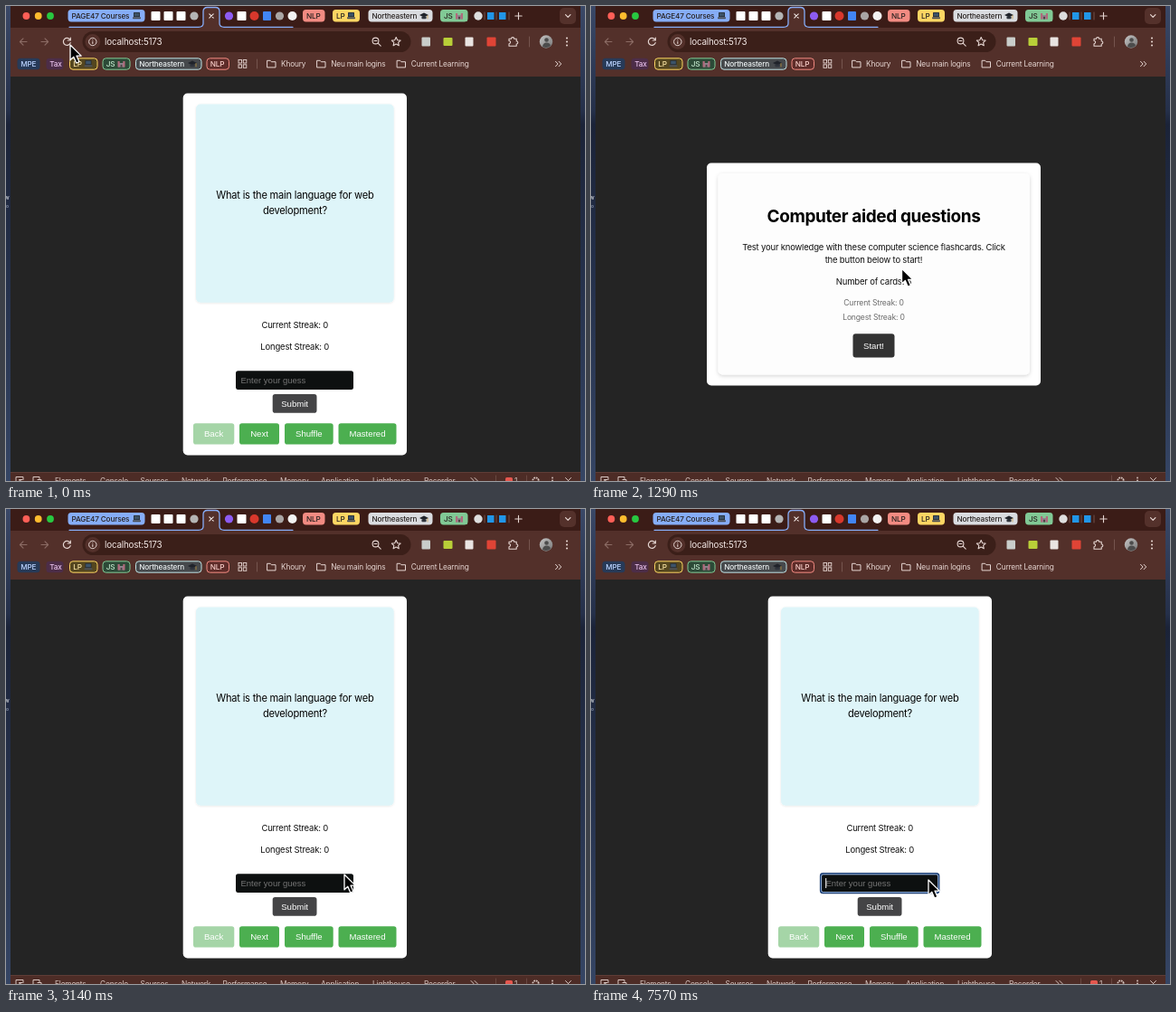
Animation, 640 px wide and 525 px high, one loop 8 s. Source, as an HTML page:

```html
<!DOCTYPE html>
<html lang="en">
<head>
<meta charset="utf-8">
<title>Flashcards</title>
<style>
  html, body { margin: 0; width: 100%; height: 100%; overflow: hidden; background: #242424; }
  svg { display: block; width: 100vw; height: 100vh; }
  text { font-family: Inter, "Open Sans", sans-serif; letter-spacing: -0.02em; white-space: pre; }
  .arial { font-family: "Liberation Sans", Arial, sans-serif; letter-spacing: 0; }
</style>
</head>
<body>
<svg id="stage" viewBox="0 0 640 525" preserveAspectRatio="none" xmlns="http://www.w3.org/2000/svg"></svg>
<script>
const LOOP = 8000, STEP = 1000 / 7;
const PALE = '#e6d6d2', DIM = '#8b6b64';

const rect = (x, y, w, h, fill, r = 0, extra = '') =>
  `<rect x="${x}" y="${y}" width="${w}" height="${h}" rx="${r}" fill="${fill}" ${extra}/>`;
const dot = (x, y, r, fill, extra = '') => `<circle cx="${x}" cy="${y}" r="${r}" fill="${fill}" ${extra}/>`;
const line = (d, color = PALE, w = 1.1) =>
  `<path d="${d}" fill="none" stroke="${color}" stroke-width="${w}" stroke-linecap="round" stroke-linejoin="round"/>`;
const text = (x, y, s, size, fill, extra = '') =>
  `<text x="${x}" y="${y}" font-size="${size}" fill="${fill}" ${extra}>${s}</text>`;
const mid = (x, y, s, size, fill, extra = '') => text(x, y, s, size, fill, 'text-anchor="middle" ' + extra);
const group = (id, body) => `<g id="${id}">${body}</g>`;

// Small pictograms used in the tab and bookmark groups
const laptop = (x, y) => rect(x - 3.5, y - 4, 7, 5, '#23282f', .6) + rect(x - 2.8, y - 3.3, 5.6, 3.6, '#3d5368')
  + rect(x - 4.5, y + 1.3, 9, 2, '#4b4f55', .8);
const cap = (x, y) => `<path d="M${x - 5} ${y - 1}l5-2.6 5 2.6-5 2.6z" fill="#20232a"/>`
  + rect(x - 2.6, y + .5, 5.2, 2.8, '#30343c', 1) + line(`M${x + 4} ${y - .5}v3.4`, '#c99b3a', .7);
const castle = (x, y) => rect(x - 3.5, y - 1, 7, 4.5, '#8d8790') + rect(x - 4, y - 3, 2.2, 6.5, '#b06a7c')
  + rect(x + 1.8, y - 3, 2.2, 6.5, '#b06a7c') + rect(x - .9, y + .8, 1.8, 2.7, '#4a3d3d');
const folder = x => line(`M${x - 4.5} 60.3h3.2l1.2 1.4h4.6v6.2h-9z`, PALE, 1);

function desktop() {
  return rect(0, 0, 640, 525, 'url(#wall)')
    + text(-2, 214, 'w', 7, '#e8ebf0') + text(0, 223, 'o', 5, '#b8c4dc')
    + rect(5, 0, 630, 525, '#242424');
}

function tabStrip() {
  const pill = (x, w, color, label, tail = '') =>
    rect(x, 4, w, 13.4, color, 3.6) + text(x + 4, 13.6, label, 8.2, '#27211f', 'font-weight="500"') + tail;
  const lights = ['#ff5f57', '#febc2e', '#28c840'].map((c, i) => dot(22.4 + 13.3 * i, 11, 3.9, c)).join('');
  const squares = [165.5, 179.5, 193.5, 260.5].map(x => rect(x - 5, 6, 10, 10, '#fff', 1)).join('');
  const seps = [529, 542, 556].map(x => line(`M${x} 7v8`, '#80605a', .8)).join('');
  return rect(5, 0, 630, 24, '#3b1c17') + lights
    + pill(68.5, 85, '#86adf8', 'PAGE47 Courses', laptop(144.5, 11))
    + squares + dot(208, 11, 4.6, '#b4b4b4')
    + '<path d="M214 24q4 0 4-4V6q0-4.5 4.5-4.5h9q4.5 0 4.5 4.5v14q0 4 4 4z" fill="#53302a"/>'
    + line('M70 23.3H213q5 0 5-4V6q0-4.5 4.5-4.5h9q4.5 0 4.5 4.5v13.3q0 4 5 4H317', '#86adf8', 1.3)
    + line('M224.8 8.8l4.4 4.4m0-4.4l-4.4 4.4', '#f3e8e5', 1.1)
    + dot(246.5, 11, 4.6, '#8d5bf2') + dot(274.5, 11, 5, '#d8382c')
    + rect(284, 6, 9, 10, '#4285f4', 1) + dot(302.5, 11, 4.6, '#a9a5a4') + dot(316.5, 11, 5, '#f2f2f2')
    + pill(328, 24.5, '#f28b82', 'NLP')
    + pill(361, 30, '#fdd663', 'LP', laptop(381.5, 11))
    + pill(400.5, 71, '#dadce0', 'Northeastern', cap(462, 11))
    + pill(480, 30.5, '#81c995', 'JS', castle(501, 11))
    + dot(522, 11, 4.7, '#dedede') + rect(532, 7, 7.5, 8, '#2196e8') + rect(545, 7, 7.5, 8, '#2196e8') + seps
    + line('M566.5 7.3v7.4m-3.7-3.7h7.4', PALE, 1.1)
    + rect(612, 2, 18, 18, '#54312b', 5) + line('M618.5 9.7l2.7 2.7 2.7-2.7', PALE, 1.2);
}

function toolbar() {
  return rect(5, 24, 630, 54, '#53302a')
    + line('M23 39.5h-7.5m3.5-3.6l-3.6 3.6 3.6 3.6M39 39.5h7.5m-3.5-3.6l3.6 3.6-3.6 3.6', DIM, 1.1)
    + dot(67.3, 39.5, 11.4, '#8a6c66', 'id="reloadHover"')
    + line('M70.8 37.3a4 4 0 1 0 .4 3.3M71.3 35v3h-3', PALE, 1.2)
    + rect(84.5, 28, 363, 23, '#3b1f19', 11.5) + dot(95.8, 39.5, 8.5, '#53302a')
    + dot(95.8, 39.5, 4.2, 'none', `stroke="${PALE}"`) + line('M95.8 39.3v2.3m0-4.2v.1', PALE, 1)
    + text(109, 43, 'localhost:5173', 9.85, '#f4e9e6')
    + dot(408.5, 38.5, 3.4, 'none', `stroke="${PALE}" stroke-width="1.1"`)
    + line('M411.2 41.2l3 3M407 38.5h3', PALE, 1.1)
    + line('M431.2 34.6l1.5 3.1 3.4.4-2.5 2.3.7 3.4-3.1-1.7-3.1 1.7.7-3.4-2.5-2.3 3.4-.4z')
    + rect(459.5, 34.5, 9.5, 10, '#c9cdca', 1) + rect(483.5, 35, 10, 9, '#b9cf38', 1)
    + rect(507.5, 34.5, 9, 10, '#e9e4e2', 1) + rect(531.5, 34.5, 10, 10, '#e04436', 1)
    + line('M556 36.2h2.5a1.6 1.6 0 0 1 3.2 0h2.5v2.6a1.6 1.6 0 0 1 0 3.2v2.3H556v-2.6a1.6 1.6 0 0 0 0-3.2z')
    + line('M578.5 34v11', '#7a5a53', .9)
    + dot(597, 39.5, 7.2, 'url(#avatar)') + dot(597.5, 37.5, 2.3, '#4c4c4c')
    + '<path d="M593 45q.5-4.5 4.5-4.5t4.5 3.5q-4 3.5-9 1z" fill="#4c4c4c"/>'
    + [35.5, 39.5, 43.5].map(y => dot(620, y, 1.05, PALE)).join('');
}

function bookmarks() {
  const chip = (x, w, bg, edge, ink, label, tail = '') =>
    rect(x, 57.8, w, 12.4, bg, 3.5, edge ? `stroke="${edge}"` : '')
    + text(x + 3.7, 66.8, label, 8.2, ink, 'font-weight="500"') + tail;
  let grid = '';
  for (const x of [257, 262.3])
    for (const y of [59.5, 64.8]) grid += rect(x, y, 3.5, 3.5, 'none', 0, `stroke="${PALE}" stroke-width=".9"`);
  return chip(12.5, 25, '#273a58', '', '#bcd4ff', 'MPE')
    + chip(44.5, 19, '#4c2d48', '', '#ecc4ef', 'Tax')
    + chip(70.5, 30.5, '#54461f', '#fdd663', '#fbe6a5', 'LP', laptop(91, 64))
    + chip(107, 30, '#2c4a37', '#81c995', '#c6ebd0', 'JS', castle(127.5, 64))
    + chip(143.5, 72.5, '#46494c', '#bfe3e4', '#eef3f4', 'Northeastern', cap(206, 64))
    + chip(222, 24.5, '#5e2c29', '#f28b82', '#f9cfca', 'NLP')
    + grid + line('M277.5 59v10', '#7a5a53', .9)
    + [293.5, 348.5, 437].map(folder).join('')
    + text(304, 66.8, 'Khoury', 8.3, PALE) + text(359.2, 66.8, 'Neu main logins', 8.3, PALE)
    + text(447.8, 66.8, 'Current Learning', 8.3, PALE)
    + line('M607.5 61.3l2.6 2.7-2.6 2.7m3.6-5.4l2.6 2.7-2.6 2.7', PALE, 1);
}

function devtools() {
  const tabs = { Elements: 54, Console: 104, Sources: 148.5, Network: 194, Performance: 239.5, Memory: 303,
    Application: 348, Lighthouse: 405, Recorder: 462 };
  const ink = '#d8c6c1';
  return rect(5, 515, 630, 10, '#4d2c26') + rect(5, 515, 630, .8, '#63423b')
    + Object.entries(tabs).map(([s, x]) => text(x, 527.7, s, 8.3, ink)).join('')
    + line('M13 527h-2v-6.5h8v3M15 523.5l4 4m-4-4v3m0-3h3M30 527v-6.5h7v2m-2 1h4v4', ink, 1)
    + line('M514 521.5l3 3-3 3m4-6l3 3-3 3M618.5 521.5l6 6m0-6l-6 6', ink, 1)
    + line('M575.5 519v6', '#70504a', .8)
    + group('errors', line('M541.5 519v6', '#70504a', .8) + rect(552, 521, 8, 7, '#e5574f', 1.5)
      + text(562, 527.7, '1', 8.3, ink))
    + dot(585.5, 524.5, 3.2, 'none', `stroke="${ink}" stroke-width="1.8" stroke-dasharray="1.7 .8"`)
    + dot(604, 521.5, .9, ink) + dot(604, 524.5, .9, ink);
}

function startPage() {
  return rect(128, 173.5, 369, 246, '#fff', 5)
    + rect(140.5, 185, 344.5, 222.5, '#fdfdfd', 5, 'filter="url(#shadow)"')
    + mid(312.5, 238.8, 'Computer aided questions', 19, '#000', 'font-weight="700"')
    + mid(312.5, 269.6, 'Test your knowledge with these computer science flashcards. Click', 9.5, '#111')
    + mid(312.5, 283.8, 'the button below to start!', 9.5, '#111')
    + mid(312.5, 307.8, 'Number of cards: 5', 9.5, '#111')
    + mid(312.5, 331, 'Current Streak: 0', 8.6, '#6a6a6a') + mid(312.5, 346.5, 'Longest Streak: 0', 8.6, '#6a6a6a')
    + rect(289.5, 362.3, 46, 26.2, '#333', 3, 'id="startButton"')
    + mid(312.5, 378.8, 'Start!', 9.6, '#fff', 'class="arial"');
}

function cardPage() {
  const button = (x, y, w, h, fill, label) =>
    rect(x, y, w, h, fill, 2.8) + mid(x + w / 2, y + h / 2 + 3.3, label, 9.6, '#fff', 'class="arial"');
  const control = (x, w, fill, label) => button(x, 461.3, w, 23.2, fill, label);
  return rect(195.7, 96.5, 247.3, 400, '#fff', 5)
    + rect(210, 108.5, 218.7, 219.3, '#def5f9', 5, 'filter="url(#soft)"')
    + mid(319.4, 213, 'What is the main language for web', 11.1, '#000')
    + mid(319.4, 230, 'development?', 11.1, '#000')
    + mid(319.2, 356.3, 'Current Streak: 0', 9.5, '#111') + mid(319.2, 380.3, 'Longest Streak: 0', 9.5, '#111')
    + rect(254, 403.3, 130, 20.7, '#0d1010', 2.5)
    + group('focus', rect(254, 403.2, 130.3, 21, '#0d1010', 2.5, 'stroke="#173a70" stroke-width="2.2"')
      + rect(254.6, 403.8, 129.1, 19.8, 'none', 2.2, 'stroke="#b9d2f5" stroke-width=".8"'))
    + text(259.5, 417, 'Enter your guess', 9.5, '#757575', 'class="arial"')
    + rect(259.2, 408, 1, 11, '#fff', 0, 'id="caret"')
    + button(294.7, 429, 48.8, 20.7, '#444446', 'Submit')
    + control(207, 45.3, '#a5d5a7', 'Back') + control(258, 44, '#4caf50', 'Next')
    + control(308, 53.7, '#4caf50', 'Shuffle') + control(367.5, 64, '#4caf50', 'Mastered');
}

function pointers() {
  const beam = 'M-3.5-9q3.5 0 3.5 3v12q0 3-3.5 3M3.5-9q-3.5 0-3.5 3v12q0 3 3.5 3M-2 2h4';
  return group('arrow', '<path d="M0 0V16.8L3.8 13.3 6.7 20 9.9 18.6 7 12.1H12.2Z" fill="#000" stroke="#fff" stroke-width="1.3" stroke-linejoin="round"/>')
    + group('beam', line(beam, '#fff', 2.6) + line(beam, '#111', 1.3));
}

const stage = document.getElementById('stage');
stage.innerHTML = `<defs>
  <linearGradient id="wall" x1="0" y1="0" x2="0" y2="1">
    <stop offset="0" stop-color="#3a4867"/><stop offset=".22" stop-color="#25304a"/>
    <stop offset=".25" stop-color="#1b2338"/><stop offset=".6" stop-color="#26324d"/><stop offset="1" stop-color="#354564"/>
  </linearGradient>
  <linearGradient id="avatar" x1="0" y1="0" x2="1" y2="1">
    <stop offset="0" stop-color="#c6c6c6"/><stop offset="1" stop-color="#777"/>
  </linearGradient>
  <filter id="shadow"><feDropShadow dx="0" dy="1.5" stdDeviation="2" flood-opacity=".17"/></filter>
  <filter id="soft"><feDropShadow dx="0" dy=".6" stdDeviation=".8" flood-opacity=".1"/></filter>
</defs>` + desktop() + tabStrip() + toolbar() + bookmarks()
  + group('startPage', startPage()) + group('cardPage', cardPage()) + devtools() + pointers();

const el = id => document.getElementById(id);
const show = (id, on) => el(id).setAttribute('visibility', on ? 'inherit' : 'hidden');

// Steps at which things happen; the screen refreshes seven times a second
const HOVER = 1, RELOAD = 4, LEAVE = 6, OVER_START = 13, START = 15, FOCUS = 25;
const BLINKS = [FOCUS, 29, 32, 36, 39, 42, 46, 50, 53];

// Pointer stops: step, x, y. It swings past the start button and comes back to it.
const path = [[0, 71, 43], [LEAVE, 71, 43], [10, 394, 336], [11, 394, 336], [OVER_START, 325, 376],
  [14, 325, 376], [START, 323, 375], [16, 323, 375], [22, 374, 404], [24, 373, 410]];

function pointerAt(step) {
  const i = path.findIndex(p => p[0] > step);
  if (i < 0) return path[path.length - 1].slice(1);
  const [s0, x0, y0] = path[i - 1], [s1, x1, y1] = path[i];
  const u = (step - s0) / (s1 - s0), e = u * u * (3 - 2 * u);
  return [x0 + (x1 - x0) * e, y0 + (y1 - y0) * e];
}

function draw(t) {
  const step = Math.floor((t + 5) / STEP);
  const starting = step >= RELOAD && step < START;
  const [x, y] = pointerAt(step);
  const overText = step === START || step === START + 1;

  show('startPage', starting);
  show('cardPage', !starting);
  show('errors', !starting);
  show('reloadHover', step >= HOVER && step <= LEAVE);
  el('startButton').setAttribute('fill', step >= OVER_START ? '#555' : '#333');
  show('focus', step >= FOCUS);
  show('caret', BLINKS.filter(s => s <= step).length % 2 === 1);
  for (const id of ['arrow', 'beam']) el(id).setAttribute('transform', `translate(${x} ${y})`);
  show('arrow', !overText);
  show('beam', overText);
}

function tick(now) {
  draw(now % LOOP);
  requestAnimationFrame(tick);
}
draw(0);
requestAnimationFrame(tick);
</script>
</body>
</html>
```
